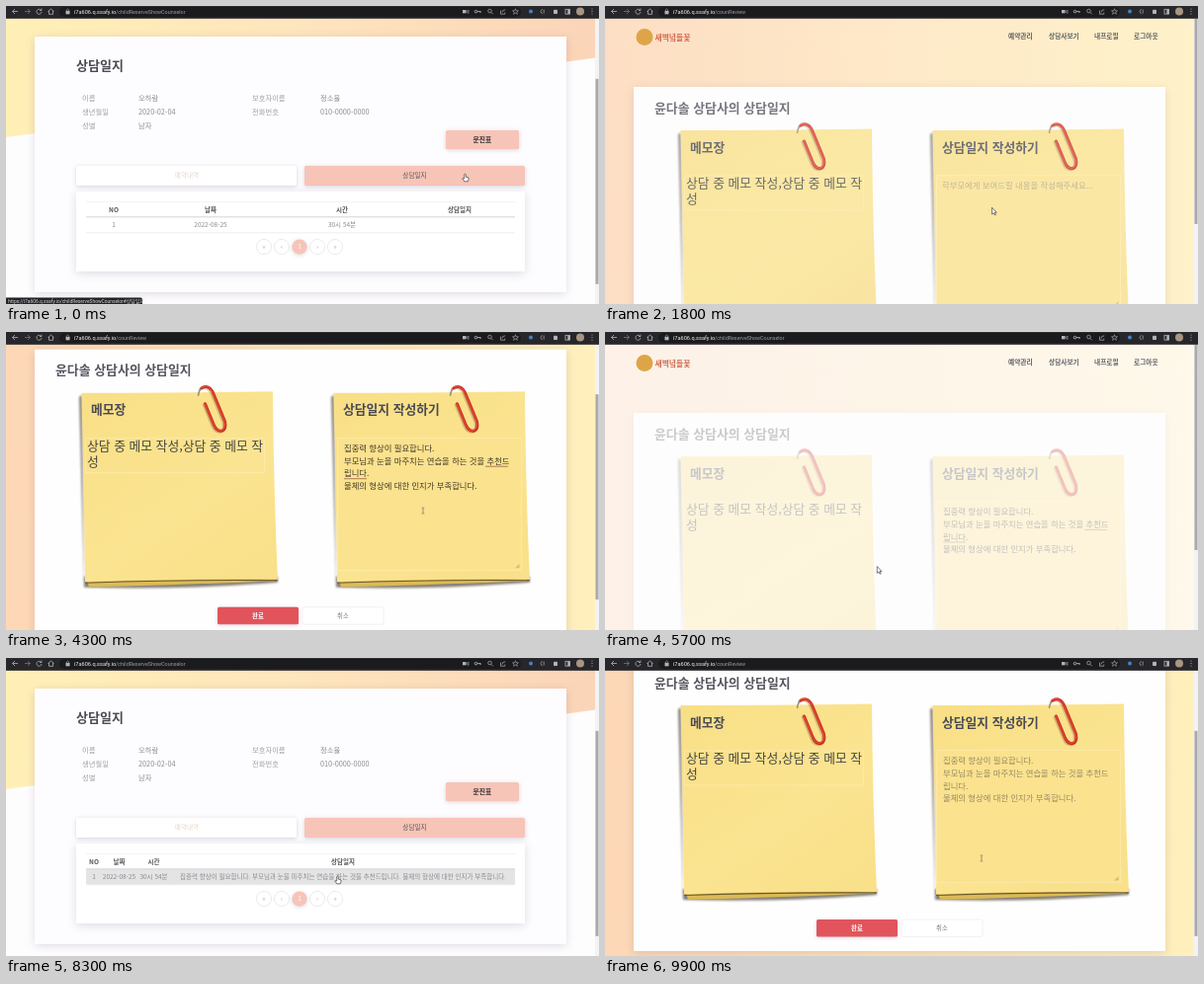
Recreate the animation shown at these times as an HTML page. Size 600 by 302 pixels, loop 10 s.

```html
<!DOCTYPE html>
<html lang="ko">
<head>
<meta charset="utf-8">
<style>
html, body { margin: 0; width: 100%; height: 100%; overflow: hidden; background: #fff; }
svg { display: block; width: 600px; height: 302px; }
text { font-family: "Noto Sans CJK KR", "Noto Sans CJK", "Noto Sans", sans-serif; white-space: pre; }
.card { filter: drop-shadow(0 2px 5px rgba(60, 50, 80, .16)); }
.low { filter: drop-shadow(0 1px 2px rgba(60, 50, 80, .2)); }
.url text { font-family: Roboto, sans-serif; }
</style>
</head>
<body>
<svg id="stage" viewBox="0 0 600 302"></svg>
<script>
const $ = id => document.getElementById(id);
const show = (id, on) => $(id).setAttribute('visibility', on ? 'inherit' : 'hidden');

// y is the visual middle of the line
const text = (x, y, size, str, fill = '#444', more = '') =>
  `<text x="${x}" y="${y + size * .37}" font-size="${size}" fill="${fill}" ${more}>${str}</text>`;
const mid = (x, y, size, str, fill, weight = 400) =>
  text(x, y, size, str, fill, `text-anchor="middle" font-weight="${weight}"`);
const rect = (x, y, w, h, fill, more = '') =>
  `<rect x="${x}" y="${y}" width="${w}" height="${h}" fill="${fill}" ${more}/>`;
const line = (d, stroke, width = 1, more = '') =>
  `<path d="${d}" fill="none" stroke="${stroke}" stroke-width="${width}" ${more}/>`;
const circle = (x, y, r, fill, more = '') => `<circle cx="${x}" cy="${y}" r="${r}" fill="${fill}" ${more}/>`;
const group = (id, body, more = '') => `<g id="${id}" ${more}>${body}</g>`;

const PINK = '#f7c4b8', INK = '#4a4a54', BOLD = 'font-weight="700"';
const LINES = [
  '집중력 향상이 필요합니다.',
  '부모님과 눈을 마주치는 연습을 하는 것을 추천드',
  '립니다.',
  '물체의 형상에 대한 인지가 부족합니다.'
];
const REPORT = `${LINES[0]} ${LINES[1]}${LINES[2]} ${LINES[3]}`;
const lineY = [182, 195, 207.5, 220];

function table(id, columns, cells) {
  const heads = ['NO', '날짜', '시간', '상담일지'];
  return group(id,
    rect(81, 292, 434, 15.5, '#e4e4e5', `id="${id}Hover"`) +
    line('M81 276.5H515', '#ececf0', .6) + line('M81 291.8H515', '#c9c9ce', .8) + line('M81 307.8H515', '#e2e2e6', .6) +
    columns.map((x, i) => mid(x, 284.5, 6.5, heads[i], '#555', 700) + mid(x, 300, 6.5, cells[i], '#8a8a90')).join(''));
}

function childPage() {
  const fields = [
    [77, 171, '이름', 134, '오하람'], [77, 185, '생년월일', 134, '2020-02-04'], [77, 199, '성별', 134, '남자'],
    [249, 171, '보호자이름', 318, '정소율'], [249, 185, '전화번호', 318, '010-0000-0000']
  ];
  const pager = ['«', '‹', '1', '›', '»'].map((s, i) => {
    const x = 261 + i * 18, on = i === 2;
    return circle(x, 322, 7.6, on ? PINK : '#fff', on ? 'class="low"' : 'stroke="#e3e3e8" stroke-width=".7"') +
      mid(x, 322, 6.5, s, on ? '#fff' : '#aaa');
  }).join('');
  return `<path d="M0 0H600V130L0 211Z" fill="url(#banner)"/>` +
    rect(29, 109, 538, 259, '#fdfcfe', 'class="card"') +
    text(71, 138, 13, '상담일지', INK, BOLD) +
    fields.map(([x, y, label, vx, value]) => text(x, y, 7.3, label, '#a0a0a6') + text(vx, y, 7.3, value, '#8c8c92')).join('') +
    rect(445, 204, 74, 19, PINK, 'rx="1.5" class="low"') + mid(482, 213.5, 6.8, '문진표', '#333', 700) +
    rect(71, 240, 223, 20, '#fff', 'rx="1.5" class="low"') + mid(183, 250, 6.6, '예약내역', '#e6d6c8') +
    rect(302, 240, 223, 20, PINK, 'rx="1.5" class="low"') + mid(413.5, 250, 6.6, '상담일지', '#555') +
    rect(71, 266, 454, 81, '#fff', 'id="sheet" class="card"') +
    group('rows',
      table('before', [109, 207, 340, 459], ['1', '2022-08-25', '30시 54분', '']) +
      table('after', [89, 114.5, 149.5, 341], ['1', '2022-08-25', '30시 54분', REPORT]) + pager);
}

function note(dx) {
  const hook = 'M194.5 129Q195 121 201 120';
  const clip = 'M198 121Q206 117 210 127L221.5 155Q223 163 218.5 164.5Q213.5 165.5 210.5 159L201.5 137';
  return `<g transform="translate(${dx} 0)">
    <path d="M74 130L79 323Q170 326 275 318V312L79 312L77 128Z" fill="#5d5648" opacity=".75" filter="url(#soft)"/>
    <path d="M82 316L84 322.5Q150 321.5 272 316.5V312Z" fill="#dcbb55"/>
    ${line('M80 318.5Q180 315 275 316', '#6b5a2c', 1.2)}
    <path d="M76.5 126Q170 126 270 124.5Q271 230 275 315Q180 314 80 317.5Q79 220 76.5 126Z" fill="url(#paper)"/>
    ${line(hook, '#9a8f86', 1.6)}
    ${line(clip, '#7a5a28', 3, 'opacity=".3" transform="translate(-1.5 1)" stroke-linecap="round"')}
    ${line(clip, '#cf2c1c', 3, 'stroke-linecap="round"')}
    ${line(clip, '#ee7560', .6, 'transform="translate(-.4 -.4)"')}
  </g>`;
}

function memoPage() {
  return rect(0, 0, 600, 400, 'url(#warm)') +
    rect(29, 82, 538, 293, '#fffeff', 'class="card"') +
    text(50, 103, 12.9, '윤다솔 상담사의 상담일지', '#55555e', BOLD) +
    note(0) + note(255) +
    text(86, 143, 12.8, '메모장', INK, BOLD) +
    text(341, 143, 12.8, '상담일지 작성하기', INK, BOLD) +
    rect(80.5, 172, 181, 35, 'none', 'stroke="#fff2c4" stroke-width=".7" opacity=".6"') +
    text(82, 179.5, 12.8, '상담 중 메모 작성,상담 중 메모 작') + text(82, 195.5, 12.8, '성') +
    rect(335.5, 171.5, 186, 134, '#fbe28e', 'stroke="#fff0ba" stroke-width=".5"') +
    line('M516 303.5L519.5 300M518 303.5L519.5 302', '#7d7247', .6) +
    text(341, 182, 8.4, '학부모에게 보여드릴 내용을 작성해주세요...', '#b3a680', 'id="hint"') +
    lineY.map((y, i) => text(342, y, 8.35, '', '', `id="line${i}"`)).join('') +
    line('M485 200.5H508M342 213H365', '#8a5040', .7, 'id="spell"') +
    line('M341.5 177V187', '#333', .7, 'id="caret"') +
    rect(214, 343, 82, 17.5, '#e2545c', 'rx="1.5" class="low"') + mid(255, 351.5, 6.4, '완료', '#fff', 700) +
    rect(300, 343, 82, 17.5, '#fff', 'rx="1.5" stroke="#ebebee" stroke-width=".7"') + mid(341, 351.5, 6.4, '취소', '#777');
}

const header = circle(40, 31.5, 8.5, '#dda548') +
  text(50.5, 32, 7.8, '새벽녘들꽃', '#d2694f', BOLD) +
  [[408, '예약관리'], [449, '상담사보기'], [495, '내프로필'], [535, '로그아웃']]
    .map(([x, s]) => text(x, 31, 6.7, s, '#606068', BOLD)).join('');

const GREY = '#b2b3b7';
const browser = rect(0, 0, 600, 12.8, '#27272b') + rect(54, 1, 467, 10, '#1b1b1e', 'rx="5"') +
  line('M12 5.5H6.5M9 3L6.5 5.5L9 8', GREY, .8) +
  line('M19 5.5H24.5M22 3L24.5 5.5L22 8', '#77787c', .8) +
  line('M35.3 4A2.5 2.5 0 1 0 36 6M36 2.5V4.5H34', GREY, .8) +
  line('M42.5 5.5L45.5 3L48.5 5.5M43.5 5V8.3H47.5V5', GREY, .8) +
  rect(60.5, 5, 4, 3.3, GREY) + line('M61.3 5V4Q62.5 2 63.7 4V5', GREY, .7) +
  `<g class="url">${text(69, 5.7, 5.6, 'i7a606.q.ssafy.io', '#f2f2f2')}${text(111, 5.7, 5.4, '', '#9a9ba0', 'id="path"')}</g>` +
  rect(462, 4, 3.6, 3.3, GREY) + line('M466 5.7L468 4V7.5Z', GREY, .6) +
  circle(475.5, 5.6, 1.3, 'none', `stroke="${GREY}" stroke-width=".9"`) + line('M477 5.6H480.5M480 5.6V7', GREY, .9) +
  circle(489.5, 5, 1.8, 'none', `stroke="${GREY}" stroke-width=".7"`) + line('M491 6.5L492.7 8.2', GREY, .8) +
  line('M500.5 4.5V8.2H504.8V6.5M502 6.5Q502 3.8 505.2 3.8', GREY, .7) +
  line('M515.5 2.7L516.3 4.8H518.5L516.8 6.1L517.4 8.3L515.5 7L513.6 8.3L514.2 6.1L512.5 4.8H514.7Z', GREY, .6) +
  circle(531, 5.6, 2, '#4a7fc4') +
  line('M542.5 3.2Q539.5 5.6 542.5 8M544.2 3.5V7.5', GREY, .7) +
  rect(554, 3.8, 4, 4.2, GREY, 'rx=".8"') +
  rect(566, 3.3, 4.6, 4.8, 'none', `stroke="${GREY}" stroke-width=".8"`) + rect(568.3, 3.3, 2.3, 4.8, GREY) +
  circle(581, 5.6, 4, '#a89584') +
  [3, 5.5, 8].map(y => circle(593, y, .6, GREY)).join('');

const pointers = '<g transform="scale(.85)">' +
  group('arrow', '<path d="M-2 -4V4L0 2.3L1.3 5L2.5 4.500L1.3 1.8H3.5Z" fill="#fff" stroke="#222" stroke-width=".7"/>') +
  group('hand', '<path d="M-1.5 -4Q-.5 -5 .3 -4V-1L3.5 0Q4 2 2.7 4.5H-1.5L-3.8 1Q-3.5 0 -1.5 1.2Z" fill="#fff" stroke="#222" stroke-width=".7"/>') +
  group('beam', line('M-1.5 -3.5H-.5L0 -3L.5 -3.5H1.5M0 -3V3M-1.5 3.5H-.5L0 3L.5 3.5H1.5', '#555', .7)) + '</g>';

const gradient = (id, stops, more = '') => `<linearGradient id="${id}" ${more}>` +
  stops.map((c, i) => `<stop offset="${i / (stops.length - 1)}" stop-color="${c}"/>`).join('') + '</linearGradient>';

$('stage').innerHTML = '<defs>' +
  gradient('banner', ['#fff0b6', '#fee5bd', '#fbd4b8']) +
  gradient('warm', ['#fdd7b6', '#fee5bb', '#fff0bd']) +
  gradient('paper', ['#f8df86', '#fae28c', '#fbe491', '#f9e08a'], 'x2=".7" y2="1"') +
  '<filter id="soft"><feGaussianBlur stdDeviation="1"/></filter></defs>' +
  rect(0, 0, 600, 302, '#fefdfe') +
  group('child', childPage()) + group('memo', memoPage()) + group('header', header) +
  rect(596, 12.5, 4, 290, '#f3f3f4') + rect(596.5, 13, 3, 208, '#a9a9ad', 'id="thumb"') +
  group('status', rect(-2, 295.5, 140, 9, '#222326', 'rx="2"') +
    text(2, 299, 4.9, 'https://i7a606.q.ssafy.io/childReserveShowCounselor#상담일지', '#d8d8da', 'style="font-family:Roboto,\'Noto Sans CJK KR\',sans-serif"')) +
  browser + group('pointer', pointers);

// Keys are [time, ...values]; two keys at one time make a jump.
const scrollKeys = [[0, 78], [900, 78], [900, 0], [1900, 0], [2500, 39], [4000, 39], [4500, 78], [5350, 78], [5350, 0],
  [6400, 0], [7000, 78], [8500, 78], [8500, 0], [9300, 0], [9800, 78]];
const pointerKeys = [[0, 465, 174], [150, 465, 174], [600, 380, 220], [1500, 380, 220], [2300, 422, 181], [4600, 422, 181],
  [5100, 277, 273], [5300, 277, 273], [5700, 277, 241], [6400, 277, 241], [7000, 413, 172], [7400, 413, 172],
  [7900, 336, 225], [9000, 336, 225], [9600, 381, 203]];
const fadeKeys = [900, 5350, 8500];

function track(keys, t) {
  let i = keys.length - 1;
  while (keys[i][0] > t) i--;
  const a = keys[i], b = keys[i + 1];
  if (!b) return a.slice(1);
  const u = (t - a[0]) / (b[0] - a[0]), e = u * u * (3 - 2 * u);
  return a.slice(1).map((v, k) => v + (b[k + 1] - v) * e);
}
const within = (t, ...spans) => spans.some(([a, b]) => t >= a && t < b);
const move = (id, x, y) => $(id).setAttribute('transform', `translate(${x} ${y})`);

function draw(t) {
  const [scroll] = track(scrollKeys, t);
  const [px, py] = track(pointerKeys, t);
  const onMemo = within(t, [1400, 5850], [9000, 10000]);
  const fade = fadeKeys.reduce((o, k) => Math.min(o, Math.abs(t - k - 500) / 500), 1);
  for (const id of ['child', 'memo', 'header']) move(id, 0, -scroll);
  show('child', !onMemo);
  show('memo', onMemo);
  $(onMemo ? 'memo' : 'child').setAttribute('opacity', fade);
  $('thumb').setAttribute('y', 13 + scroll * .78);
  $('path').textContent = within(t, [900, 5350], [8500, 10000]) ? '/counReview' : '/childReserveShowCounselor';
  show('status', within(t, [0, 300], [6900, 7600]));

  const first = t < 900, later = within(t, [6000, 8500]);
  show('rows', first || later);
  show('before', first);
  show('after', later);
  show('beforeHover', first && t >= 500);
  show('afterHover', later && t >= 7800);
  $('sheet').setAttribute('height', first || later ? 81 : 22);

  const total = LINES.join('').length, saved = t > 6000;
  let left = Math.round(total * Math.min(1, Math.max(0, (t - 2800) / 1200)));
  show('hint', left === 0);
  show('caret', left === 0 && t >= 2500);
  show('spell', left === total && !saved);
  LINES.forEach((s, i) => {
    $('line' + i).textContent = s.slice(0, Math.max(0, left));
    $('line' + i).setAttribute('fill', saved ? '#968a66' : '#40392a');
    left -= s.length;
  });

  const beam = within(t, [2100, 4700], [9500, 10000]);
  const hand = within(t, [0, 900], [5000, 5350], [6800, 8500]);
  move('pointer', px, py);
  show('beam', beam);
  show('hand', hand);
  show('arrow', !beam && !hand);
}

const start = performance.now();
function tick() {
  draw(Math.floor((performance.now() - start) % 10000 / 100) * 100);
  requestAnimationFrame(tick);
}
tick();
</script>
</body>
</html>
```
